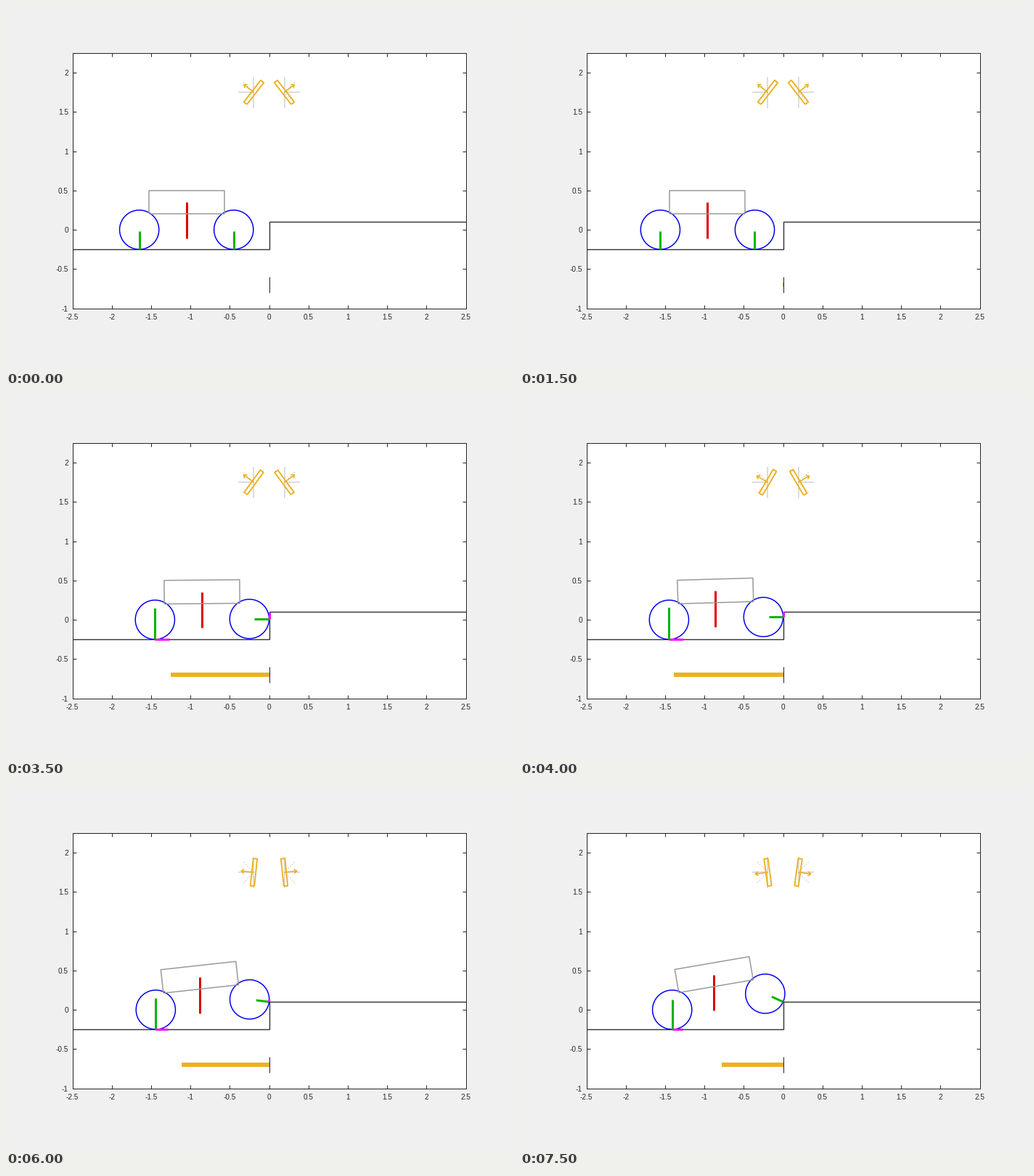
Write a matplotlib script that moves like this. It is 700x500 px and loops after 8 s.

```python
import numpy as np
import matplotlib.pyplot as plt
from matplotlib.animation import FuncAnimation

W, H, DPI = 700, 500, 100
PX = 72 / DPI  # one pixel in points
R, BASE, STEP = 0.25, 1.2, 0.1
N = 16
AMBER, DARK = "#edb120", "#262626"

plt.rcParams["font.family"] = "Liberation Sans"

# Plate turning speed per step (also the bar length) and the resulting tilt
SPEED = np.array([0, 0, 0, .005, .02, .06, .28, 1.25, 1.39, 1.385,
                  1.325, 1.22, 1.11, 1.0, .885, .775])
TILT = np.radians(37.8) - 0.08 * np.concatenate([[0], np.cumsum(SPEED)[:-1]])

# Contact forces at a few moments
KEYS = [4, 5, 6, 7, 8.5, 10, 13, 15]
REAR_N = [.23, .24, .265, .395, .412, .408, .395, .378]
FRONT_N = [.23, .225, .205, .187, .178, .17, .161, .158]
REAR_T = [0, 0, 0, .185, .176, .167, .152, .134]
FRONT_T = [0, 0, 0, .08, .065, .05, .025, .015]

fig = plt.figure(figsize=(W / DPI, H / DPI), dpi=DPI, facecolor="#f0f0f0")
ax = fig.add_axes([91.5 / W, 1 - 417.5 / H, 542 / W, 352.5 / H])
ax.set_xlim(-2.5, 2.5)
ax.set_ylim(-1, 2.25)
xt, yt = np.arange(-2.5, 2.6, 0.5), np.arange(-1, 2.1, 0.5)
ax.set_xticks(xt, [f"{v:g}" for v in xt])
ax.set_yticks(yt, [f"{v:g}" for v in yt])
ax.tick_params(direction="in", top=True, right=True, length=5 * PX, width=PX,
               color=DARK, labelcolor=DARK, labelsize=10 * PX)
ax.tick_params(axis="x", pad=7.5 * PX)
ax.tick_params(axis="y", pad=5.5 * PX)
for spine in ax.spines.values():
    spine.set(color=DARK, linewidth=PX)


def line(color, px, xs=(), ys=(), **kw):
    kw.setdefault("solid_capstyle", "butt")
    return ax.plot(xs, ys, color=color, lw=px * PX, **kw)[0]


def segment(art, start, vec):
    art.set_data([start[0], start[0] + vec[0]], [start[1], start[1] + vec[1]])


line("#303030", 1.4, [-2.5, 0, 0, 2.5], [-R, -R, STEP, STEP],
     solid_joinstyle="miter")
bar = line(AMBER, 6)
line("#202020", 1, [0, 0], [-0.8, -0.6])


class Gauge:
    """Tilting plate with a normal arrow, facing left (-1) or right (1)."""

    def __init__(self, side):
        self.side, self.pos = side, np.array([0.194 * side, 1.75])
        x, y = self.pos
        d = 0.2 / np.sqrt(2)
        line("#dddddd", 2, [x, x + 0.2 * side], [y, y])
        line("#dddddd", 2, [x, x], [y - 0.2, y + 0.2])
        for s in (-1, 1):
            line("#cccccc", 1.4, [x, x + d * side], [y, y + d * s], ls=":")
        self.plate = line(AMBER, 1.9)
        self.shaft = line(AMBER, 1.6)
        self.head = line(AMBER, 1.6)

    def set(self, a):
        n = np.array([self.side * np.cos(a), np.sin(a)])
        t = np.array([-self.side * np.sin(a), np.cos(a)])
        signs = [(-1, -1), (-1, 1), (1, 1), (1, -1), (-1, -1)]
        pts = [self.pos + 0.175 * u * t + 0.025 * v * n for u, v in signs]
        self.plate.set_data(*np.transpose(pts))
        segment(self.shaft, self.pos, 0.16 * n)
        tip = self.pos + 0.16 * n
        barbs = [tip - 0.035 * n + 0.028 * t, tip, tip - 0.035 * n - 0.028 * t]
        self.head.set_data(*np.transpose(barbs))


gauges = [Gauge(-1), Gauge(1)]

ring = np.linspace(0, 2 * np.pi, 121)
wheels = [line("#0000ee", 1.5) for _ in range(2)]
weight = line("#dd0000", 3)
body = line("#999999", 1.5)
normals = [line("#00b400", 3) for _ in range(2)]
frictions = [line("#ff00ff", 3) for _ in range(2)]


def pose(k):
    """Rear and front wheel centres; the front climbs once it meets the step."""
    if k < 7:
        x = -1.65 + 0.03 * k
        return np.array([x, 0]), np.array([x + BASE, 0])
    y = 0.0105 + 0.0242 * (k - 7)
    x = -np.sqrt(R**2 - max(y - STEP, 0)**2)
    return np.array([x - np.sqrt(BASE**2 - y**2), 0]), np.array([x, y])


def draw(k):
    rear, front = pose(k)
    for w, c in zip(wheels, (rear, front)):
        w.set_data(c[0] + R * np.cos(ring), c[1] + R * np.sin(ring))

    u = (front - rear) / BASE
    v = np.array([-u[1], u[0]])
    mid = (rear + front) / 2
    box = [(-.48, .2), (.48, .2), (.48, .5), (-.48, .5), (-.48, .2)]
    body.set_data(*np.transpose([mid + a * u + b * v for a, b in box]))
    segment(weight, mid + 0.35 * v, (0, -0.46))

    below = np.array([0, -R])
    touch = front + below if k < 7 else np.array([0, min(front[1], STEP)])
    loads = [(rear, rear + below, REAR_N, REAR_T),
             (front, touch, FRONT_N, FRONT_T)]
    for i, (c, p, fn, ft) in enumerate(loads):
        n = (c - p) / R
        segment(normals[i], p, np.interp(k, KEYS, fn) * n)
        slip = np.interp(k, KEYS, ft)
        segment(frictions[i], p, slip * np.array([n[1], -n[0]]))
        frictions[i].set_visible(slip > 0)

    bar.set_data([-SPEED[k], 0], [-0.7, -0.7])
    bar.set_visible(SPEED[k] > 0)
    for g in gauges:
        g.set(TILT[k])
    return []


anim = FuncAnimation(fig, draw, frames=N, init_func=lambda: draw(0),
                     interval=500, repeat=True, repeat_delay=0)
plt.show()
```
